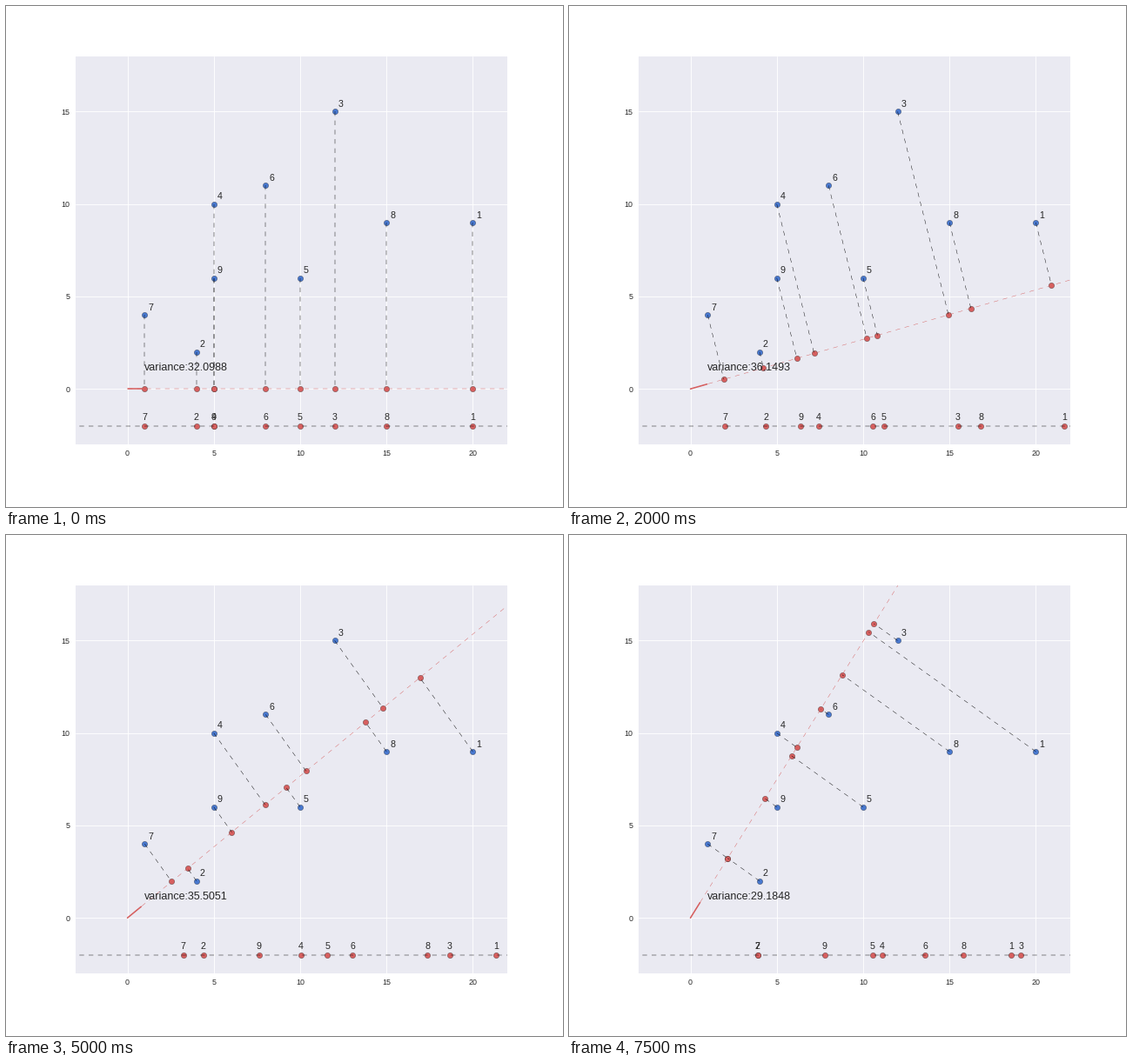
Recreate the animation shown at these times as a matplotlib script. Size 640 by 576 pixels, loop 8000 ms.

```python
import numpy as np
import matplotlib.pyplot as plt
from matplotlib.animation import FuncAnimation

INK = "0.15"
BLUE, RED = "#4878CF", "#D65F5F"
FRAMES, STEP = 16, np.radians(3.75)
BASE = -2  # height of the flattened axis

plt.rcParams.update({
    "font.family": "Liberation Sans",
    "text.color": INK,
    "lines.scale_dashes": False,
    "lines.dashed_pattern": [6, 6],
    "lines.solid_capstyle": "round",
    "axes.axisbelow": True,
})

points = np.array([(20, 9), (4, 2), (12, 15), (5, 10), (10, 6),
                   (8, 11), (1, 4), (15, 9), (5, 6)], float)

fig = plt.figure(figsize=(10, 9), dpi=64, facecolor="white")
ax = fig.add_axes([0.125, 0.125, 0.775, 0.775], facecolor="#EAEAF2")
ax.set(xlim=(-3, 22), ylim=(-3, 18),
       xticks=range(0, 21, 5), yticks=range(0, 16, 5))
ax.grid(color="white", lw=1, ls="-")
ax.tick_params(length=0, pad=7, labelsize=10, labelcolor=INK)
for spine in ax.spines.values():
    spine.set_visible(False)


def dots(xy, color):
    return ax.scatter(*xy.T, s=50, c=color, edgecolors="black", linewidths=0.3)


def dashed(xs=(), ys=(), color="black"):
    return ax.plot(xs, ys, "--", color=color, lw=0.5)[0]


dots(points, BLUE)
shadows = dots(points, RED)
flat = dots(points, RED)

dashed((-100, 100), (BASE, BASE))
axis_line = dashed(color=RED)
unit, = ax.plot([], [], color=RED, lw=1.75)
drops = [dashed() for _ in points]

flat_labels = []
for n, (x, y) in enumerate(points, 1):
    ax.text(x + 0.2, y + 0.25, str(n), size=12)
    flat_labels.append(ax.text(x, BASE + 0.3, str(n), size=12, ha="center"))
caption = ax.text(1, 1, "", size=14)


def update(i):
    u = np.array([np.cos(i * STEP), np.sin(i * STEP)])
    dist = points @ u
    proj = np.outer(dist, u)

    unit.set_data([0, u[0]], [0, u[1]])
    axis_line.set_data([0, 100 * u[0]], [0, 100 * u[1]])
    shadows.set_offsets(proj)
    flat.set_offsets(np.column_stack([dist, np.full(len(dist), BASE)]))
    for drop, p, q in zip(drops, points, proj):
        drop.set_data([p[0], q[0]], [p[1], q[1]])
    for label, d in zip(flat_labels, dist):
        label.set_x(d)
    caption.set_text(f"variance:{dist.var():.4f}")


anim = FuncAnimation(fig, update, frames=FRAMES, interval=500,
                     init_func=lambda: update(0), repeat=True,
                     repeat_delay=0, blit=False)
plt.show()
```
